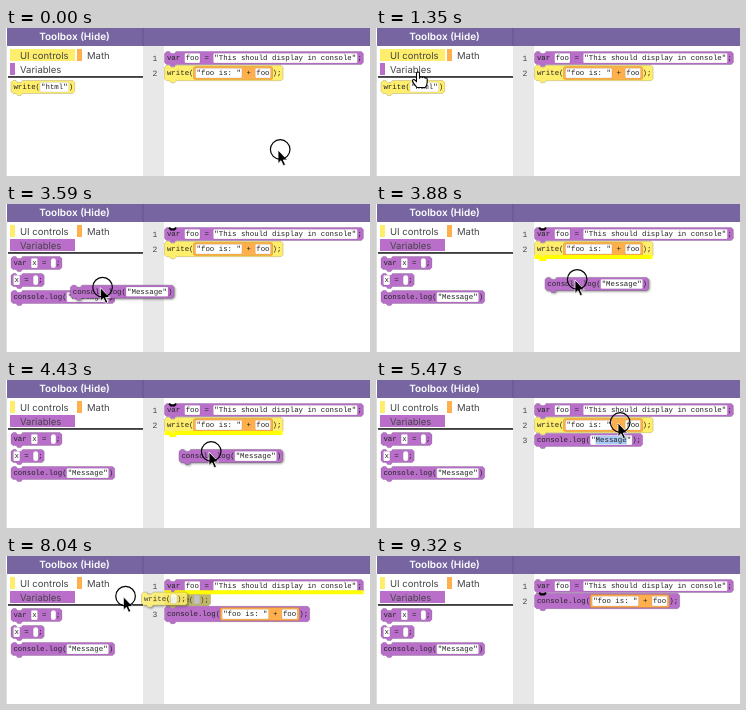
These frames come from a looping animation (364 by 148 pixels, 9.8 s). An HTML page:

```html
<!DOCTYPE html>
<html lang="en">
<head>
<meta charset="utf-8">
<title>Block editor</title>
<style>
  html, body { margin: 0; width: 100%; height: 100%; overflow: hidden; background: #fff; }
  svg { display: block; }
  text { text-rendering: geometricPrecision; }
  .ui { font: 9.5px Inter, "Open Sans", sans-serif; fill: #444; }
  .title { font: 600 10px Inter, "Open Sans", sans-serif; fill: #fff; }
  .code { font: 7.4px "Liberation Mono", "DejaVu Sans Mono", monospace; fill: #222; }
  .line { font: 8px "Liberation Mono", "DejaVu Sans Mono", monospace; fill: #444; }
  .drag { filter: drop-shadow(1.5px 1.5px 1px rgba(0, 0, 0, .45)); }
</style>
</head>
<body>
<svg id="stage" width="364" height="148" viewBox="0 0 364 148"></svg>
<script>
const LOOP = 9800, CHAR = 7.4 * 0.6;
const PURPLE = '#b96fca', YELLOW = '#ffee6c', ORANGE = '#ffb04d', GLOW = '#ffff00';
const stage = document.getElementById('stage');

function el(tag, attrs, parent = stage, text) {
  const node = document.createElementNS('http://www.w3.org/2000/svg', tag);
  for (const key in attrs) node.setAttribute(key, attrs[key]);
  if (text !== undefined) node.textContent = text;
  return parent.appendChild(node);
}
const group = (parent = stage) => el('g', {}, parent);
const rect = (x, y, width, height, fill, parent, extra) =>
  el('rect', { x, y, width, height, fill, ...extra }, parent);
const label = (cls, x, y, text, parent) => el('text', { class: cls, x, y }, parent, text);
const move = (node, x, y) => node.setAttribute('transform', `translate(${x} ${y})`);

// Parts shown only during given [from, to) spans
const timed = [];
function during(node, ...spans) {
  timed.push({ node, spans });
  return node;
}

// Tokens: 'text', ['field'], or { expr: tokens } for a nested orange block.
// Every block is drawn around its vertical centre.
const isField = Array.isArray;
function tokenWidth(tok) {
  if (isField(tok)) return tok[0] ? tok[0].length * CHAR + 2 : 5;
  if (tok.expr) return totalWidth(tok.expr) + 4;
  return tok.length * CHAR;
}
function totalWidth(tokens) {
  return tokens.reduce((sum, tok) => sum + tokenWidth(tok), 0);
}
const heightOf = tokens => tokens.some(tok => tok.expr) ? 15.5 : 13;

function drawTokens(g, tokens, x) {
  for (const tok of tokens) {
    const w = tokenWidth(tok);
    if (isField(tok)) {
      rect(x, -4.7, w, 9.6, '#fff', g,
        { rx: tok[0].trim() ? .8 : 2, stroke: '#000', 'stroke-opacity': .18, 'stroke-width': .5 });
      if (tok[1]) rect(x + 1 + CHAR, -4.2, w - 2 - 2 * CHAR, 8.6, '#a9c8f5', g);
      label('code', x + 1, 2.3, tok[0], g);
    } else if (tok.expr) {
      drawExpr(g, tok.expr, x);
    } else {
      const text = tok.trimStart();
      label('code', x + (tok.length - text.length) * CHAR, 2.3, text.trim(), g);
    }
    x += w;
  }
}

function drawExpr(g, tokens, x) {
  rect(x, -6.4, totalWidth(tokens) + 4, 13, ORANGE, g,
    { rx: 1.8, stroke: '#b06a10', 'stroke-opacity': .5, 'stroke-width': .6 });
  drawTokens(g, tokens, x + 2);
}

function outline(tokens) {
  const w = totalWidth(tokens) + 4, h = heightOf(tokens);
  return `M2 ${-h / 2}h3l1.5 2h3.5l1.5-2H${w - 2}l2 2v${h - 4}l-2 2` +
    'H11.5l-1.5 2h-3.5l-1.5-2h-3l-2-2V' + (2 - h / 2) + 'z';
}

function block(x, y, color, tokens, parent) {
  const g = group(parent);
  el('path', { d: outline(tokens), fill: color, stroke: '#000', 'stroke-opacity': .22, 'stroke-width': .7 }, g);
  drawTokens(g, tokens, 2.4);
  move(g, x, y);
  return g;
}

function glow(x, y, tokens) {
  const g = el('path', { d: outline(tokens), fill: 'none', stroke: '#f5e400', 'stroke-width': 1.6 });
  move(g, x, y);
  return g;
}

function dropLine(y, w) {
  const g = el('path', {
    d: `M0 0H5l1.5 2h3.5l1.5-2H${w}`, fill: 'none', stroke: GLOW, 'stroke-width': 4
  });
  move(g, 158.5, y);
  return g;
}

// Page frame
rect(0, 18, 1, 130, '#ddd');
rect(1, 0, 363, 18, '#7665a0');
rect(136.5, 0, 1, 18, '#655590');
rect(137, 18, 21, 130, '#e8e8e8');
label('title', 33.2, 11.5, 'Toolbox (Hide)');
rect(2, 48.2, 135, 1.5, '#111');

// Toolbox
function toolbox(active) {
  const g = group();
  rect(4, 21, active ? 5 : 65, 12, YELLOW, g);
  rect(71, 21, 5, 12, ORANGE, g);
  rect(4, 35, active ? 65 : 5, 12, PURPLE, g);
  label('ui', 14, 30.5, 'UI controls', g);
  label('ui', 81, 30.5, 'Math', g);
  label('ui', 14, 44.5, 'Variables', g);
  return g;
}
const message = ['console.log(', ['"Message"'], ')'];
const html = ['write(', ['"html"'], ')'];
const controls = during(toolbox(false), [0, 2070]);
block(5, 59, YELLOW, html, controls);
const variables = during(toolbox(true), [2070, LOOP]);
block(5, 59, PURPLE, ['var ', ['x'], ' = ', [''], ';'], variables);
block(5, 76, PURPLE, [['x'], ' = ', [''], ';'], variables);
block(5, 93, PURPLE, message, variables);
during(glow(5, 59, html), [745, 1230]);
during(glow(5, 93, message), [2950, 3420]);

// Program: a row holding a nested block is taller, so rows shift as it moves
const LEFT = 158.5, ROW1 = 30, ROW2 = 45, ROW2_FLAT = 43.3, ROW3 = 60, ROW3_TALL = 58;
const sum = [['"foo is: "'], ' + ', ['foo']];
const logSum = ['console.log(', { expr: sum }, ');'];
const fullWrite = ['write(', { expr: sum }, ');'];
const emptyWrite = ['write(', [' '], ');'];
const lineNumber = (n, y) => label('line', 146.6, y + 3, n);

lineNumber(1, ROW1);
during(lineNumber(2, ROW2), [0, 6280], [8313, LOOP]);
during(lineNumber(2, ROW2_FLAT), [6280, 8313]);
during(lineNumber(3, ROW3), [4610, 6280]);
during(lineNumber(3, ROW3_TALL), [6280, 8313]);

block(LEFT, ROW1, PURPLE, ['var ', ['foo'], ' = ', ['"This should display in console"'], ';']);
during(block(LEFT, ROW2, YELLOW, fullWrite), [0, 6280]);
during(rect(187.5, ROW2 - 6.4, totalWidth(sum) + 4, 13, '#777', stage, { rx: 1.8, opacity: .35 }), [5520, 6280]);
during(block(LEFT, ROW2_FLAT, YELLOW, emptyWrite), [6280, 8313]);
const shade = during(el('path', { d: outline(emptyWrite), fill: '#666', opacity: .4 }), [7580, 8313]);
move(shade, LEFT, ROW2_FLAT);
during(block(LEFT, ROW3, PURPLE, ['console.log(', ['"Message"', true], ');']), [4610, 6280]);
during(rect(214.2, ROW3 - 4.7, 9 * CHAR + 2, 9.6, 'none', stage, { stroke: GLOW, 'stroke-width': 1.6 }), [5640, 6280]);
during(block(LEFT, ROW3_TALL, PURPLE, logSum), [6280, 8313]);
during(block(LEFT, ROW2, PURPLE, logSum), [8313, LOOP]);
during(dropLine(53, 118), [3770, 4610]);
during(dropLine(36.3, 199), [7647, 8313]);

// Blinking insertion mark
function caret(y, ...spans) {
  const g = el('path', {
    d: 'M0 .6l1.7 1.8h3.4l1.7-1.8', fill: 'none', stroke: '#000', 'stroke-width': 2.1
  });
  move(g, 163.2, y);
  during(g, ...spans);
}
caret(23, [2070, 2540], [3020, 4610], [5520, 5920]);
caret(66, [6280, 6810], [7290, 7580]);
caret(36, [8380, 8850], [9320, LOOP]);

// Dragged blocks
const dragLog = during(block(0, 0, PURPLE, message), [3420, 4610]);
const dragSum = during(group(), [5520, 6280]);
drawExpr(dragSum, sum, 0);
const dragWrite = during(block(0, 0, YELLOW, emptyWrite), [7580, 8313]);
for (const g of [dragLog, dragSum, dragWrite]) g.setAttribute('class', 'drag');
dragWrite.setAttribute('opacity', .85);

// Pointer
const pointer = during(group(), [0, 9080]);
during(el('path', {
  d: 'M0 0V13.5l3-2.8 2.3 5 2.2-1-2.3-4.8H9.5z',
  fill: '#000', stroke: '#fff', 'stroke-width': .8
}, pointer), [0, 1350], [2720, LOOP]);
during(el('path', {
  d: 'M-1.5 1q1.5-2 3 0V6l1-1q1.5-.5 2 .5l.8-.5q1.5-.3 1.8 1l.7-.2q1.4 0 1.4 1.5V10q0 3-2 5.5H-1Q-5 11-5.5 9q0-2 2-1.2l2 1.7z',
  fill: '#fff', stroke: '#000', 'stroke-width': 1.1
}, pointer), [1350, 2720]);
during(el('circle', {
  cx: 2.2, cy: -.5, r: 9.8, fill: 'none', stroke: '#000', 'stroke-width': 1.2
}, pointer), [0, 50], [2070, 2180], [3420, 4610], [5470, 6280], [7400, 8313]);

// start, end, steps, x, y
const moves = [
  [470, 880, 7, 66, 62],
  [1110, 1350, 5, 42, 44],
  [2720, 3060, 7, 35, 88],
  [3420, 3940, 10, 203.7, 75.6],
  [4110, 4430, 6, 203, 72],
  [4850, 4960, 3, 190, 73],
  [5020, 5240, 5, 242, 43],
  [5520, 5920, 8, 245, 57.5],
  [7290, 7400, 3, 178, 43],
  [7580, 8380, 13, 87.5, 39.5],
  [8850, 9080, 4, 340, 152]
];
const ease = f => f * f * (3 - 2 * f);

function pointerAt(t) {
  let x = 272, y = 122;
  for (const [start, end, steps, toX, toY] of moves) {
    if (t < start) break;
    const step = Math.floor((t - start) / (end - start) * (steps - 1) + .15) + 1;
    const f = ease(Math.min(1, step / steps));
    x += (toX - x) * f;
    y += (toY - y) * f;
  }
  return [x, y];
}

function render(t) {
  for (const { node, spans } of timed) {
    const on = spans.some(([from, to]) => t >= from && t < to);
    node.style.display = on ? '' : 'none';
  }
  const [x, y] = pointerAt(t);
  move(pointer, x, y);
  move(dragLog, x - 30, y + 4);
  move(dragSum, x - 54, y + 2);
  move(dragWrite, Math.max(135.5, x - 19.5), y + 2);
}

const begin = performance.now();
function tick() {
  render((performance.now() - begin) % LOOP);
  requestAnimationFrame(tick);
}
render(0);
requestAnimationFrame(tick);
</script>
</body>
</html>
```
